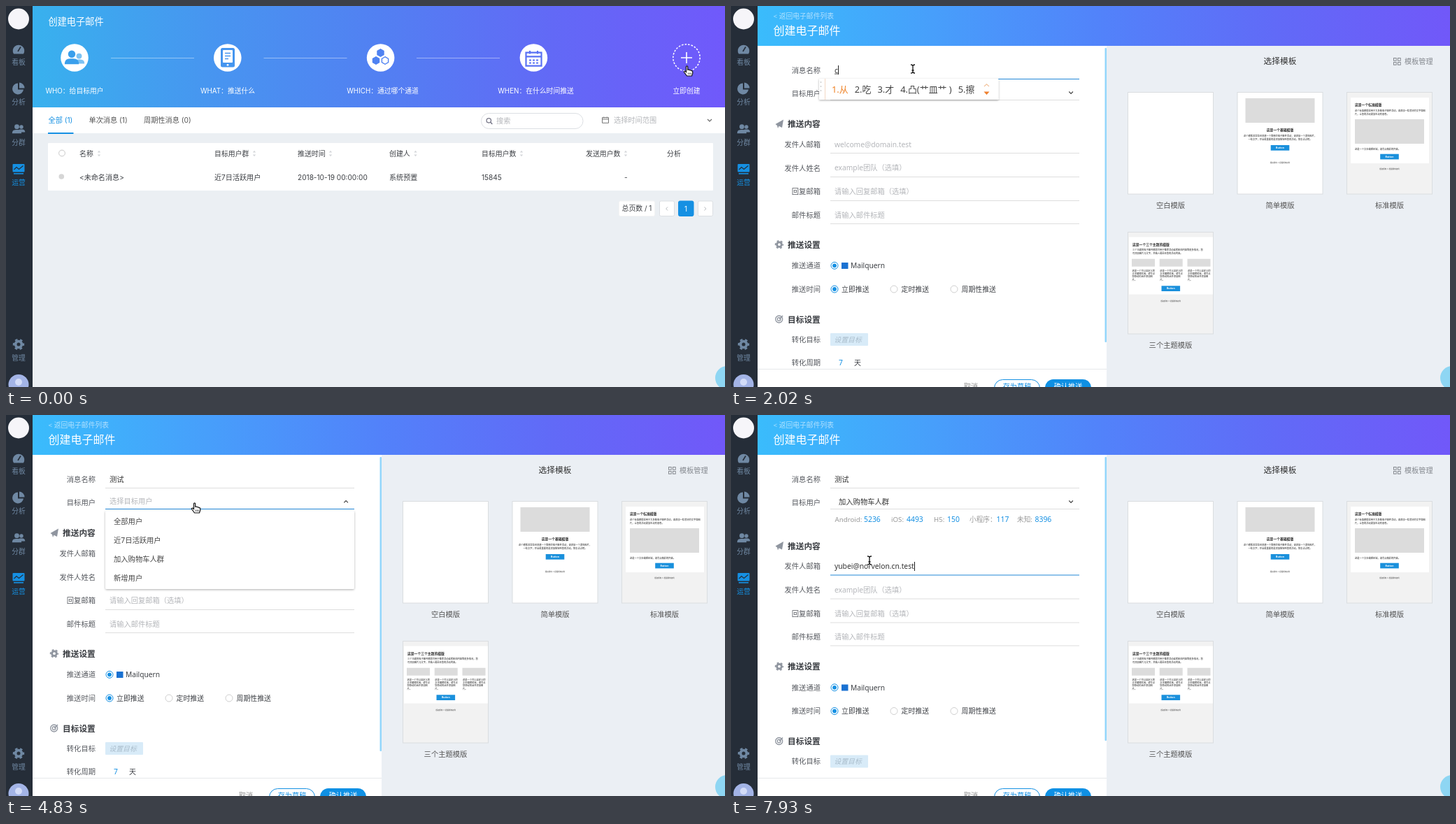
Write an HTML page that moves like this. It is 1028 by 545 pixels and loops after 8000 ms.

```html
<!DOCTYPE html>
<html lang="zh-CN">
<head>
<meta charset="utf-8">
<title>创建电子邮件</title>
<style>
html,body{margin:0;width:100%;height:100%;overflow:hidden;background:#ebeff4}
svg{display:block;width:1028px;height:545px;font-family:'Noto Sans','Noto Sans CJK SC',sans-serif}
text{white-space:pre}
.ui{font-family:Inter,'Noto Sans CJK SC',sans-serif}
.m{font-weight:500}
.b{font-weight:700}
.mid{text-anchor:middle}
.end{text-anchor:end}
</style>
</head>
<body>
<svg id="stage" viewBox="0 0 1028 545"></svg>
<script>
const BLUE = '#1590e3', INK = '#3c3f44', HINT = '#b4b6ba', LINE = '#dedede';
const $ = id => document.getElementById(id);

// ---- drawing helpers; text is placed by its vertical centre ----
const t = (x, y, size, s, fill = INK, cls = '', more = '') =>
  `<text x="${x}" y="${+(y + size * .37).toFixed(2)}" font-size="${size}" fill="${fill}" class="${cls}" ${more}>${s}</text>`;
const r = (x, y, w, h, fill, more = '') =>
  `<rect x="${x}" y="${y}" width="${w}" height="${h}" fill="${fill}" ${more}/>`;
const c = (x, y, rad, fill, more = '') =>
  `<circle cx="${x}" cy="${y}" r="${rad}" fill="${fill}" ${more}/>`;
const p = (d, fill, more = '') => `<path d="${d}" fill="${fill}" ${more}/>`;
const ln = (d, color, w = 1, more = '') => p(d, 'none', `stroke="${color}" stroke-width="${w}" ${more}`);
const g = (s, more = '') => `<g ${more}>${s}</g>`;

const gear = (x, y, k, fill) =>
  c(x, y, 4.4 * k, 'none', `stroke="${fill}" stroke-width="${3.8 * k}"`) +
  c(x, y, 7 * k, 'none', `stroke="${fill}" stroke-width="${2.4 * k}" stroke-dasharray="${3.67 * k}" stroke-dashoffset="${1.8 * k}"`);
const person = (x, y, k, fill) =>
  g(c(0, -4, 3.6, fill) + p('M-7 6C-7 1-4 .5 0 .5S7 1 7 6z', fill), `transform="translate(${x} ${y}) scale(${k})"`);
const hex = (x, y, k, fill, more) =>
  p(`M${x} ${y - k}l${k * .87} ${k / 2}v${k}l${-k * .87} ${k / 2}l${-k * .87} ${-k / 2}v${-k}z`, fill, more);
const calendar = (x, y, w, color, sw) =>
  ln(`M${x - w / 2} ${y - w * .38}h${w}v${w * .86}h${-w}zM${x - w / 2} ${y - w * .12}h${w}M${x - w / 4} ${y - w / 2}v${w * .2}M${x + w / 4} ${y - w / 2}v${w * .2}`, color, sw);

// ---- sidebar ----
function sidebar() {
  const off = '#6f88a3', bg = '#252d38';
  const label = (y, s, col) => t(18, y, 9.8, s, col, 'mid');
  return r(0, 0, 38, 545, bg) + c(18, 18.5, 15, '#f6f5f9') +
    p('M11 68.5A8.3 8.3 0 1 1 25 68.5z', off) + ln('M17 65L21 58.5', bg, 1.6) + label(80.5, '看板', off) +
    p('M17 110.500A8 8 0 1 0 25 119.500H17z', off) + p('M19 109.500A8 8 0 0 1 26.500 117.500H19z', off) +
    label(137.5, '分析', off) +
    person(22, 176, .75, off) + person(15.5, 176.5, .95, off) + label(195.5, '分群', off) +
    r(9.5, 226, 17, 11.5, BLUE, 'rx="1"') + ln('M11.500 234L15 230.500L18.500 233.500L24.500 228.500', bg, 1.2) +
    r(11, 239, 14, 1.6, BLUE) + label(252.5, '运营', BLUE) +
    gear(18, 484, 1, off) + label(503.5, '管理', off) +
    c(18, 541.5, 14.5, '#a3b4e6') + c(18, 538, 5, '#d3dcf7') + p('M8 552C8 543 28 543 28 552z', '#d3dcf7');
}

// ---- message list page ----
function listPage() {
  const sort = x => p(`M${x - 2.2} 209.5h4.400l-2.200-2.700zM${x - 2.2} 212.500h4.400l-2.200 2.700z`, '#d4d6d9');
  const steps = [[98, 'WHO：给目标用户'], [317, 'WHAT：推送什么'], [538.5, 'WHICH：通过哪个通道'], [757.5, 'WHEN：在什么时间推送']];
  const heads = [[105, '名称', 133], [298, '目标用户群', 355], [417, '推送时间', 464], [548, '创建人', 585.5],
    [680, '目标用户数', 737], [829, '发送用户数', 886], [945, '分析']];
  const cells = [[105, '&lt;未命名消息&gt;'], [298, '近7日活跃用户'], [417, '2018-10-19 00:00:00'], [548, '系统预置'], [680, '15845'], [884, '-']];
  const pager = (x, w, fill, edge) => r(x, 279, w, 21.5, fill, `rx="2" stroke="${edge}"`);
  let s = r(38, 0, 990, 545, '#ebeff3') + r(38, 0, 990, 145, 'url(#sky)') +
    t(60.5, 22, 13.2, '创建电子邮件', '#fff', 'm');
  s += steps.map(([x, name]) => t(x, 121.5, 9.8, name, '#fff', 'mid')).join('');
  s += [98, 316.8, 535.6, 754.4].map(x => c(x, 74, 19.8, '#fff')).join('');
  s += [150, 368.5, 587].map(x => ln(`M${x} 74.500h119`, 'rgba(255,255,255,.42)')).join('');
  s += person(104.5, 76, 1.1, '#7cc2f3') + person(94, 74.5, 1.45, '#3a9fec') +
    r(307, 60, 20, 27.5, '#4595ef', 'rx="2.5"') + r(310, 63, 14, 18, '#fff', 'rx="1"') +
    ln('M313 67.500h8M313 71.500h8M313 75.500h5', '#4595ef', 1.6) + c(317, 84.3, 1.4, '#fff') +
    hex(535.5, 67, 6, '#4f82f2') + hex(529, 78, 6, '#4f82f2') + hex(542, 78, 5.3, '#fff', 'stroke="#4f82f2" stroke-width="1.4"') +
    calendar(754.5, 75, 22, '#5a72f4', 2.2) + ln('M748 77.500h13M748 81.500h13', '#5a72f4', 2, 'stroke-dasharray="3 2"');
  s += g(c(973, 74, 19.2, 'none', 'stroke="#fff" stroke-width="1.5" stroke-dasharray="2.600 2"') +
    ln('M965 74h16M973 66v16', '#fff', 1.6) + t(973, 121.5, 9.8, '立即创建', '#fff', 'mid'), 'id="create"');
  s += r(38, 145, 990, 37, '#fff') + t(60.5, 163.5, 10.2, '全部 (1)', BLUE) + r(60, 181, 36.5, 2, BLUE) +
    t(118.5, 163.5, 10.2, '单次消息 (1)', '#555') + t(197, 163.5, 10.2, '周期性消息 (0)', '#555') +
    r(679.5, 153.5, 145.5, 22, '#fff', 'rx="11" stroke="#dcdfe3"') +
    c(690.3, 163.8, 3.2, 'none', 'stroke="#778" stroke-width="1.3"') + ln('M692.700 166.300l2.600 2.700', '#778', 1.5) +
    t(701, 164.5, 10.2, '搜索', HINT) + calendar(857, 163, 9, '#777', 1) +
    t(869, 163.5, 10.2, '选择时间范围', HINT) + ln('M1003 162l3 3l3-3', '#666', 1.1);
  s += r(60, 196, 951, 68, '#fff', 'rx="1"') + c(80, 210.5, 4.4, '#fff', 'stroke="#c8c8c8"') + c(79.3, 244, 3.8, '#d6d6d6');
  s += heads.map(([x, name, sx]) => t(x, 211, 9.9, name) + (sx ? sort(sx) : '')).join('');
  s += cells.map(([x, v]) => t(x, 245, 10.1, v)).join('');
  s += pager(876.5, 51, '#fff', '#f4f4f4') + t(902, 289.5, 9.9, '总页数 / 1', INK, 'mid') +
    pager(934.5, 21, '#fff', '#dcdfe3') + ln('M946 287.500l-2.300 2.500l2.300 2.500', '#b8bcc0') +
    pager(961.5, 21.5, BLUE, BLUE) + t(972, 290, 9.9, '1', '#fff', 'mid') +
    pager(989.5, 21, '#fff', '#dcdfe3') + ln('M998.500 287.500l2.300 2.500l-2.300 2.500', '#b8bcc0');
  return g(s, 'id="list" class="ui"');
}

// ---- form page ----
const label = (y, s) => t(128, y, 10.3, s, '#55585e', 'end');
const under = (i, y) => r(142, y, 356, 1, LINE, `id="u${i}"`);
const radio = (x, y, on, more = '') => g(c(x, y, 5, '#fff', `stroke="${on ? BLUE : '#d0d0d0'}"`) +
  (on ? c(x, y, 2.9, BLUE, 'class="dot"') : ''), more);
const head = (y, s) => t(81, y, 11.7, s, '#3a3d42', 'b');

function formPage() {
  const rows = [[198, '发件人邮箱', 'welcome@domain.test'], [231.7, '发件人姓名', 'example团队（选填）'],
    [265.3, '回复邮箱', '请输入回复邮箱（选填）'], [299, '邮件标题', '请输入邮件标题']];
  const stats = [[148.5, 'Android:', 190, 5236], [229, 'iOS:', 251, 4493], [290, 'H5:', 309, 150],
    [341, '小程序：', 379.5, 117], [409, '未知:', 434.5, 8396]];
  const grey = '#8f959f';
  let low = p('M63.500 169L75 162.500L73 174L68.500 171.800L67 175L66 171z', grey) + head(168.7, '推送内容');
  low += rows.map(([y, name, hint], i) => label(y, name) + t(148, y, 10.25, hint, HINT, '', `id="h${i + 2}"`) + under(i + 2, Math.round(y + 12.4))).join('');
  low += gear(69, 341.2, .76, grey) + head(341.5, '推送设置') + label(371.3, '推送通道') +
    t(142.5, 371.3, 10.1, '+ 配置推送通道', BLUE, '', 'id="addWay"') +
    g(radio(148, 371.3, true) + r(158, 367, 9.5, 9, '#1971d2') + t(171, 371.3, 10.2, 'Mailquern'), 'id="way"') +
    label(405, '推送时间') + radio(148, 405, true, 'id="now"') + t(158, 405, 9.9, '立即推送') +
    radio(233, 405) + t(243.5, 405, 9.9, '定时推送') + radio(319, 405) + t(329.5, 405, 9.9, '周期性推送') +
    c(68.7, 448, 5, 'none', `stroke="${grey}" stroke-width="1.300"`) + c(68.7, 448, 2.4, 'none', `stroke="${grey}" stroke-width="1.200"`) +
    ln('M69 448l5-5', grey, 1.4) + head(448.3, '目标设置') +
    label(477, '转化目标') + r(142, 468, 54, 18, '#d8ebf8', 'rx="1"') + t(147.5, 477, 9.8, '设置目标', '#a9bccb', '', 'font-style="italic"') +
    label(510.5, '转化周期') + t(157, 510.5, 10.3, '7', BLUE, 'mid') + t(176, 510.5, 10, '天');
  let s = r(38, 57, 499, 488, '#fff') + r(537, 57, 491, 488, '#ebeff4') + r(38, 0, 990, 57, 'url(#sky2)') +
    t(60.5, 14, 9.8, '&lt; 返回电子邮件列表', 'rgba(255,255,255,.6)') + t(60.5, 35.3, 16, '创建电子邮件', '#fff', 'm') +
    label(91.7, '消息名称') + t(148, 91.7, 10.25, '输入消息名称', HINT, '', 'id="h0"') + under(0, 104) +
    label(124.8, '目标用户') + t(148, 123.7, 10.25, '选择目标用户', HINT, '', 'id="h1"') +
    t(154, 123.7, 10.3, '加入购物车人群', '#333', '', 'id="picked"') + under(1, 134) +
    ln('M483.300 122.500l2.800 2.800l2.800-2.800', '#444', 1.2, 'id="chev"') +
    g(stats.map(([x, k, nx, v]) => t(x, 149, 9.7, k, '#999') + t(nx, 149, 10.4, v, BLUE, 'm')).join(''), 'id="stats"') +
    g(low, 'id="low"') + t(148, 0, 10.3, '', '#333', '', 'id="name"') + t(148, 0, 10.3, '', '#333', '', 'id="mail"') +
    r(148, 0, 0, .8, '#333', 'id="pre"') + r(0, 0, 1, 13, '#222', 'id="caret"');
  s += r(38, 519, 496, 26, '#fff') + r(38, 519, 499, 1, '#e6e8ea') + t(343, 544.7, 10, '取消', '#888', 'mid') +
    r(376.5, 534.5, 65, 24, '#fff', `rx="12" stroke="${BLUE}"`) + t(409, 544.7, 10.2, '存为草稿', BLUE, 'mid') +
    r(449, 534, 66, 24, '#0f90e4', 'rx="12"') + t(482, 544.7, 10.2, '确认推送', '#fff', 'mid') +
    r(534.5, 60, 2.5, 421, '#94d6fb', 'rx="1" id="bar"');
  return g(s + templates() + dropdown(), 'id="form"');
}

function templates() {
  const grey = '#dcdcdc', ink = '#1c1c1c';
  const tiny = (x, y, s, cls = '') => t(x, y, 3.25, s, ink, 'm ' + cls);
  const card = (x, y, fill, name) => r(x + .5, y + .5, 122, 145.5, fill, 'stroke="#dadde0"') + t(x + 61.5, y + 161.7, 10.3, name, '#555', 'mid');
  const button = (x, y) => r(x - 13.3, y, 26.6, 7.7, '#1a90dc') + t(x, y + 3.8, 3.4, 'Button', '#fff', 'mid b');
  const foot = (x, y) => t(x, y, 2.5, '版权所有 © 保留所有权利', '#333', 'mid m');
  let s = t(785, 79, 11.7, '选择模板', '#333', 'mid m') + t(963, 79.3, 10.2, '模板管理', '#85898f') +
    [[947.5, 74.5], [953.5, 74.5], [947.5, 80.5], [953.5, 80.5]].map(([x, y]) => r(x, y, 3.7, 3.7, 'none', 'stroke="#85898f"')).join('');
  s += card(567, 123, '#fff', '空白模版') +
    card(723.5, 123, '#fff', '简单模版') + r(735.5, 132, 99, 35, grey) + t(785, 177, 4.8, '这是一个基础模版', '#222', 'mid b') +
    tiny(785, 185.5, '这个模版非常适合创建一个简单的电子邮件活动，请添加一个漂亮图片，', 'mid') +
    tiny(785, 190.5, '一些文字，并且最重要的是添加按钮到您的活动，快去试试吧。', 'mid') +
    button(785, 199) + foot(785, 224);
  s += card(880, 123, '#f2f2f2', '标准模版') + r(886, 131, 112, 94, '#fff') + t(892, 141.5, 4.8, '这是一个标准模版', '#222', 'b') +
    tiny(892, 149.5, '这个标准模版适用于大多数电子邮件活动，请添加一些美好的文字和图') +
    tiny(892, 154.7, '片，让您的活动更加生动有意思。') + r(892, 162, 99, 35, grey) +
    tiny(892, 204.5, '这是一个文本编辑区域，请写点精彩的内容。') + button(941.5, 211.7) + foot(941.5, 233.2);
  s += card(567, 323, '#f2f2f2', '三个主题模版') + r(569, 330.5, 120, 82, '#fff') + t(574, 341, 4.8, '这是一个三个主题的模版', '#222', 'b') +
    tiny(574, 349.2, '三个主题的电子邮件模版可用于推荐活动或者新闻内容等很多情况，您') + tiny(574, 354.2, '可添加图片与文字，并插入最适合您的活动内容。');
  const words = ['这是一个可以自定义的', '文本编辑区域，请写点', '您想说的话并添加图', '片。'];
  for (const x of [573, 612.7, 652.5])
    s += r(x, 361.7, 33, 11, grey) + words.map((w, i) => tiny(x + .5, 378.3 + i * 4.4, w)).join('');
  return g(s + button(628.8, 400.3) + foot(628.8, 421.8), 'id="cards"');
}

function dropdown() {
  const items = ['全部用户', '近7日活跃用户', '加入购物车人群', '新增用户'];
  return g(r(142, 137, 356, 112, '#fff', 'rx="2" filter="url(#soft)"') +
    r(142, 193, 356, 27, '#e6f5fd', 'id="hover"') +
    items.map((s, i) => t(154, 152.5 + i * 27, 10.3, s, '#444')).join(''), 'id="drop"');
}

const pointers =
  g(p('M0 0V11.500L2.800 9L4.700 13.200L6.700 12.300L4.800 8.300H8.500z', '#111', 'stroke="#fff" stroke-width="1"'), 'id="arrow"') +
  g(p('M-1.500 0C-1.500-1.500.7-1.500.7 0V4.300C2 3.600 3 4 3.200 4.800C4.500 4.300 5.400 4.800 5.600 5.600C7 5.300 7.700 6 7.700 7.200V9.500L6.500 13H-.5L-4.500 7.500C-5 6-3.300 5.600-1.500 7.500z', '#fff', 'stroke="#111" stroke-width="1.200"') +
    ln('M1.500 8.500v2.500M3.500 8.500v2.500M5.300 8.500v2.500', '#111', .7), 'id="hand"') +
  g([['#fff', 3], ['#111', 1.3]].map(([col, w]) =>
    ln('M-3-6Q0-6 0-4Q0-6 3-6M0-5V5M-3 6Q0 6 0 4Q0 6 3 6M-1.500 2H1.500', col, w)).join(''), 'id="beam"');

const stops = list => list.map((col, i) => `<stop offset="${i / (list.length - 1)}" stop-color="${col}"/>`).join('');
$('stage').innerHTML = `<defs>
<linearGradient id="sky">${stops(['#38b1ee', '#4796f0', '#5280f2', '#6269f6', '#7059fb'])}</linearGradient>
<linearGradient id="sky2">${stops(['#3abcfc', '#479ffb', '#5282fa', '#616af7', '#7158f9'])}</linearGradient>
<filter id="soft" x="-10%" y="-30%" width="120%" height="170%"><feDropShadow dx="0" dy="1" stdDeviation="1.800" flood-opacity=".32"/></filter>
</defs>` + listPage() + formPage() + sidebar() + c(1031, 532, 17, '#8ed6f3') +
  g(r(126, 0, 258, 30, '#fff', 'rx="1" id="imeBox" filter="url(#soft)"') + r(134, 0, 1, 30, '#f3d9c4') +
    [5, 11, 17].map(y => c(128.5, y, .9, '#c9c9c9')).join('') + t(144, 15.3, 12.9, '', '#444', '', 'id="imeText"') +
    g(ln('M-3.500-4l3.500-3.200l3.500 3.200', '#f3c39c', 1.2) + p('M-4 3.500h8l-4 4.500z', '#ee7f2d'), 'id="imeNav"'), 'id="ime"') +
  pointers;

// ---- timeline: each entry changes part of the state and holds ----
const nums = s => s.split(' ').map((w, i) => `${i + 1}.${w}`);
const CE = nums('测 侧 策 册 厕'), CESHI = nums('测试 侧室 侧视 测时 策士');
const YU = nums('与 于 语 鱼 雨'), YUBEI = nums('预备 玉杯 鱼背 雨备 语贝');
const MAIL = 'yubei@norvelon.cn.test';
const start = { page: 0, press: 0, ptr: 'hand', x: 974, y: 87, cards: 0, way: 0, dot: 2.9, focus: -1, hot: -1, caret: 0,
  name: '', mail: '', pre: 0, ime: 0, drop: 0, row: 0, flip: 0, picked: 0, stats: 0 };
const moves = [
  [150, { press: 1 }],
  [470, { page: 1, ptr: 'arrow', x: 520, y: 141, dot: 1 }],
  [620, { x: 328, y: 171 }],
  [770, { x: 288, y: 125, dot: 2.9, way: 1 }],
  [920, { ptr: 'beam', x: 264, y: 97, cards: 1 }],
  [1070, { x: 260, y: 90, hot: 0 }],
  [1390, { focus: 0, caret: 1 }],
  [1540, { caret: 0 }],
  [2020, { caret: 1, pre: 1, name: 'c', ime: ['1.从', '2.吃', '3.才', '4.凸(艹皿艹 )', '5.擦'] }],
  [2620, { name: 'ce', ime: CE }],
  [2770, { name: "ce's", ime: CESHI }],
  [2910, { name: "ce'sh" }],
  [3060, { name: "ce'shi" }],
  [3210, { name: '测试', pre: 0, ime: 0 }],
  [3650, { caret: 0 }],
  [3800, { x: 266, y: 112 }],
  [3950, { ptr: 'hand', x: 270, y: 127, hot: 1 }],
  [4100, { focus: 1, flip: .4 }],
  [4240, { drop: .4 }],
  [4390, { drop: .8, flip: .7 }],
  [4540, { drop: 1 }],
  [4680, { flip: .9 }],
  [4830, { flip: 1 }],
  [5130, { x: 252, y: 148 }],
  [5280, { x: 216, y: 182 }],
  [5420, { x: 201, y: 196, row: 1 }],
  [5570, { picked: 1, drop: .6, row: 0, flip: .5 }],
  [5720, { drop: 0, flip: 0, hot: -1 }],
  [5860, { focus: -1, ptr: 'beam', x: 202, y: 198 }],
  [6010, { focus: 2 }],
  [6300, { caret: 1, pre: 1, mail: 'y', ime: nums('有 一 也 要 用') }],
  [6450, { mail: 'yu', ime: YU }],
  [6600, { mail: "yu'b", ime: YUBEI }],
  [6740, { mail: "yu'be" }],
  [6890, { mail: "yu'bei" }],
  [7040, { caret: 0 }],
  [7340, { caret: 1, mail: 'yubei@', ime: [MAIL, '更多网址、邮箱(分号)'] }],
  [7630, { mail: MAIL, pre: 0, ime: 0 }],
  [7780, { stats: 1 }],
  [7930, { x: 198, y: 208 }]
];

const show = (id, on) => $(id).setAttribute('visibility', on ? 'visible' : 'hidden');
const set = (id, attrs) => { for (const k in attrs) $(id).setAttribute(k, attrs[k]); };

function drawIme(s, y) {
  show('ime', s.ime);
  if (!s.ime) { show('imeNav', 0); return; }
  const wide = s.ime.length === 2;
  set('ime', { transform: `translate(0 ${y})` });
  $('imeText').innerHTML = s.ime.map((w, i) =>
    `<tspan dx="${i ? (wide ? 14 : 9) : 0}" fill="${i ? '#444' : '#ef8123'}">${w}</tspan>`).join('');
  const box = $('imeText').getBBox(), right = box.x + box.width + (wide ? 23 : 34);
  set('imeBox', { width: right - 126 });
  set('imeNav', { transform: `translate(${right - 17} 15)` });
  show('imeNav', !wide);
}

function draw(s) {
  const onForm = s.page === 1, shift = s.stats ? 18.5 : 0;
  $('list').style.display = onForm ? 'none' : '';
  $('form').style.display = onForm ? '' : 'none';
  set('create', { opacity: s.press ? .75 : 1 });
  $('cards').style.display = s.cards ? '' : 'none';
  $('way').style.display = s.way ? '' : 'none';
  show('addWay', !s.way);
  show('bar', s.cards);
  document.querySelector('#now .dot').setAttribute('r', s.dot);
  show('h0', !s.name);
  show('h1', !s.picked);
  show('h2', !s.mail);
  show('picked', s.picked);
  show('stats', s.stats);
  set('low', { transform: `translate(0 ${shift})` });
  set('bar', { height: shift ? 406 : 421 });
  for (let i = 0; i < 6; i++) set('u' + i, { fill: i === s.focus ? '#2387d6' : i === s.hot ? '#7dc3ef' : LINE });
  set('chev', { transform: `rotate(${180 * s.flip} 486.100 123.900)` });
  $('drop').style.display = s.drop ? '' : 'none';
  set('drop', { opacity: s.drop, transform: `translate(0 ${137 * (1 - s.drop)}) scale(1 ${s.drop || 1})` });
  show('hover', s.row);

  const onMail = s.focus === 2, mid = onMail ? 198 + shift : 91.7;
  $('name').textContent = s.name;
  $('mail').textContent = s.mail;
  set('name', { y: 95.5 });
  set('mail', { y: 201.8 + shift });
  const text = onMail ? s.mail : s.name;
  const w = text ? $(onMail ? 'mail' : 'name').getComputedTextLength() : 0;
  show('caret', s.caret);
  set('caret', { x: text ? Math.round(148 + w) : 147, y: Math.round(mid - 6.5) });
  show('pre', s.pre);
  set('pre', { y: mid + 5, width: w });
  drawIme(s, onMail ? 210 : 104);

  for (const id of ['arrow', 'hand', 'beam']) show(id, s.ptr === id);
  set(s.ptr, { transform: `translate(${s.x} ${s.y})` });
}

const states = [start];
for (const [, change] of moves) states.push({ ...states[states.length - 1], ...change });

const begin = performance.now();
let last = -1;
function tick() {
  const now = (performance.now() - begin) % 8000;
  const i = moves.filter(([at]) => at <= now).length;
  if (i !== last) draw(states[last = i]);
  requestAnimationFrame(tick);
}
tick();
</script>
</body>
</html>
```
